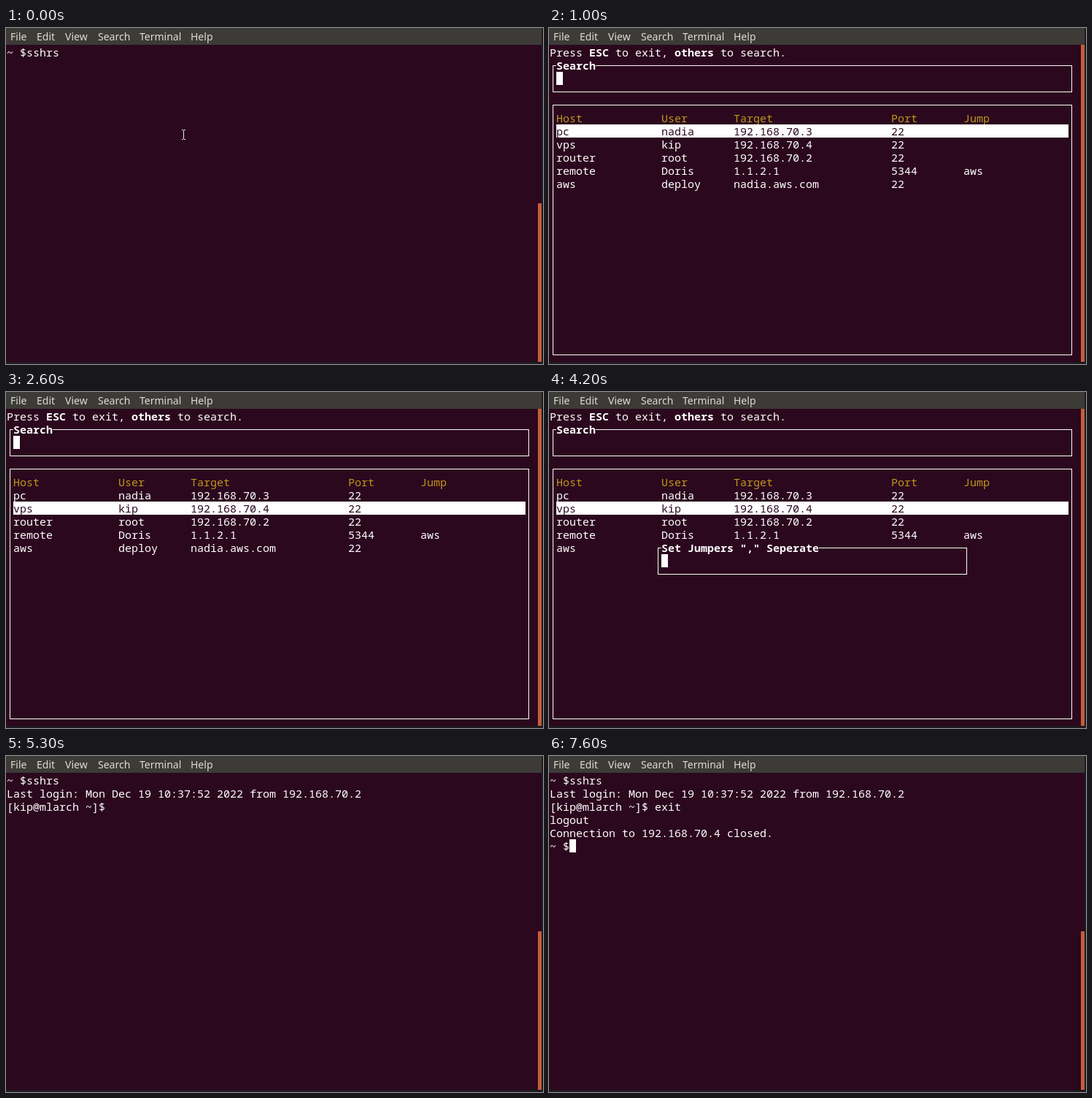
An HTML page that plays this animation: 736 px wide and 460 px high, repeating every 8 s.

```html
<!DOCTYPE html>
<html lang="en">
<head>
<meta charset="utf-8">
<title>Terminal session</title>
<style>
  html, body { margin: 0; width: 736px; height: 460px; overflow: hidden; background: #2b081e; }
  svg { display: block; }
  text { white-space: pre; }
  .menu { font: 14px "Noto Sans", "Open Sans", sans-serif; fill: #dfdbd2; }
  #screen { font: 15px "Noto Sans Mono", "DejaVu Sans Mono", monospace; fill: #fff; }
  .bold { font-weight: 700; }
  .head { fill: #c2951a; }
  .inverse { fill: #2b081e; }
  .line { fill: none; stroke: #fff; stroke-width: 1; }
</style>
</head>
<body>
<svg width="736" height="460" viewBox="0 0 736 460">
  <rect width="736" height="460" fill="#2b081e"/>
  <rect width="736" height="23" fill="#3c3b37"/>
  <g class="menu" id="menu"></g>
  <g id="screen"></g>
  <rect id="bar" x="729" width="5" fill="#c65d3b"/>
  <rect x="734" y="0" width="2" height="460" fill="#1e1a20"/>
  <rect x="0" y="457" width="736" height="3" fill="#1e1a20"/>
  <path id="pointer" d="M241 139.5h2m1 0h2M243.5 140v12M241 152.5h2m1 0h2" fill="none" stroke="#e8e8e8"/>
</svg>
<script>
const LOOP = 8000, CELL = 9, ROW = 18, BG = '#2b081e';
const $ = id => document.getElementById(id);
const px = col => 1 + col * CELL;
const py = row => 24 + row * ROW;

const text = (col, row, str, cls = '') =>
  `<text x="${px(col)}" y="${py(row) + 15}" class="${cls}">${str}</text>`;
const block = (col, row, cols = 1, rows = 1, fill = '#fff') =>
  `<rect x="${px(col)}" y="${py(row)}" width="${cols * CELL}" height="${rows * ROW}" fill="${fill}"/>`;

// Box lines run through the middle of their character cells.
const box = (c1, r1, c2, r2) =>
  `<rect class="line" x="${px(c1) + 4.5}" y="${py(r1) + 9.5}" width="${(c2 - c1) * CELL}" height="${(r2 - r1) * ROW}"/>`;
const titledBox = (c1, r1, c2, r2, title) =>
  box(c1, r1, c2, r2) + block(c1 + 1, r1, title.length, 1, BG) + text(c1 + 1, r1, title, 'bold');

const COLS = [1, 17, 28, 52, 63];
const HOSTS = [
  ['pc', 'nadia', '192.168.70.3', '22', ''],
  ['vps', 'kip', '192.168.70.4', '22', ''],
  ['router', 'root', '192.168.70.2', '22', ''],
  ['remote', 'Doris', '1.1.2.1', '5344', 'aws'],
  ['aws', 'deploy', 'nadia.aws.com', '22', '']
];
const tableRow = (cells, row, cls) =>
  cells.map((s, i) => text(COLS[i], row, s, cls)).join('');

function picker(selected, popup) {
  let out = text(0, 0, 'Press <tspan class="bold">ESC</tspan> to exit, <tspan class="bold">others</tspan> to search.');
  out += titledBox(0, 1, 79, 3, 'Search') + box(0, 4, 79, 23);
  out += tableRow(['Host', 'User', 'Target', 'Port', 'Jump'], 5, 'head');
  HOSTS.forEach((cells, i) => {
    const on = i === selected;
    if (on) out += block(1, 6 + i, 78);
    out += tableRow(cells, 6 + i, on ? 'inverse' : '');
  });
  if (popup) out += block(16, 10, 48, 3, BG) + titledBox(16, 10, 63, 12, 'Set Jumpers "," Seperate');
  return out;
}

const shell = lines => lines.map((s, i) => text(0, i, s)).join('');

const START = ['~ $sshrs'];
const LOGIN = [...START, 'Last login: Mon Dec 19 10:37:52 2022 from 192.168.70.2'];
const PROMPT = '[kip@mlarch ~]$ ';
const typed = str => shell([...LOGIN, PROMPT + str]);
const closed = shell([...LOGIN, PROMPT + 'exit', 'logout', 'Connection to 192.168.70.4 closed.', '~ $']);
const start = shell(START), first = picker(0), second = picker(1), jumpers = picker(1, true);

// [time, content, cursor cell or null]
const SEARCH = [1, 2], JUMP = [17, 11];
const STEPS = [
  [0, start, null],
  [100, start, [8, 0]],
  [1000, first, SEARCH],
  [1300, first, null],
  [1900, first, SEARCH],
  [2500, first, null],
  [2600, second, SEARCH],
  [3100, second, null],
  [3300, second, SEARCH],
  [3500, jumpers, JUMP],
  [3900, jumpers, null],
  [4200, jumpers, JUMP],
  [4500, start, [0, 1]],
  [4700, shell(LOGIN), [0, 2]],
  [4800, typed(''), [16, 2]],
  [5300, typed(''), null],
  [5500, typed('e'), [17, 2]],
  [5900, typed('ex'), [18, 2]],
  [6000, typed('exi'), [19, 2]],
  [6100, typed('exit'), [20, 2]],
  [6600, closed, [3, 5]],
  [7500, closed, null],
  [7600, closed, [3, 5]]
];

$('menu').innerHTML = [['File', 6], ['Edit', 42], ['View', 81], ['Search', 126], ['Terminal', 183], ['Help', 253]]
  .map(([s, x]) => `<text x="${x}" y="17">${s}</text>`).join('');

let shown = null;
function draw(t) {
  $('pointer').style.display = t < 700 ? '' : 'none';
  const step = STEPS.findLast(s => s[0] <= t);
  if (step === shown) return;
  shown = step;
  const [time, content, cursor] = step;
  $('screen').innerHTML = content + (cursor ? block(...cursor) : '');
  const top = time >= 1000 && time < 4500 ? 23 : 240;
  $('bar').setAttribute('y', top);
  $('bar').setAttribute('height', 457 - top);
}

const origin = performance.now();
function tick() {
  draw((performance.now() - origin) % LOOP);
  requestAnimationFrame(tick);
}
tick();
</script>
</body>
</html>
```
